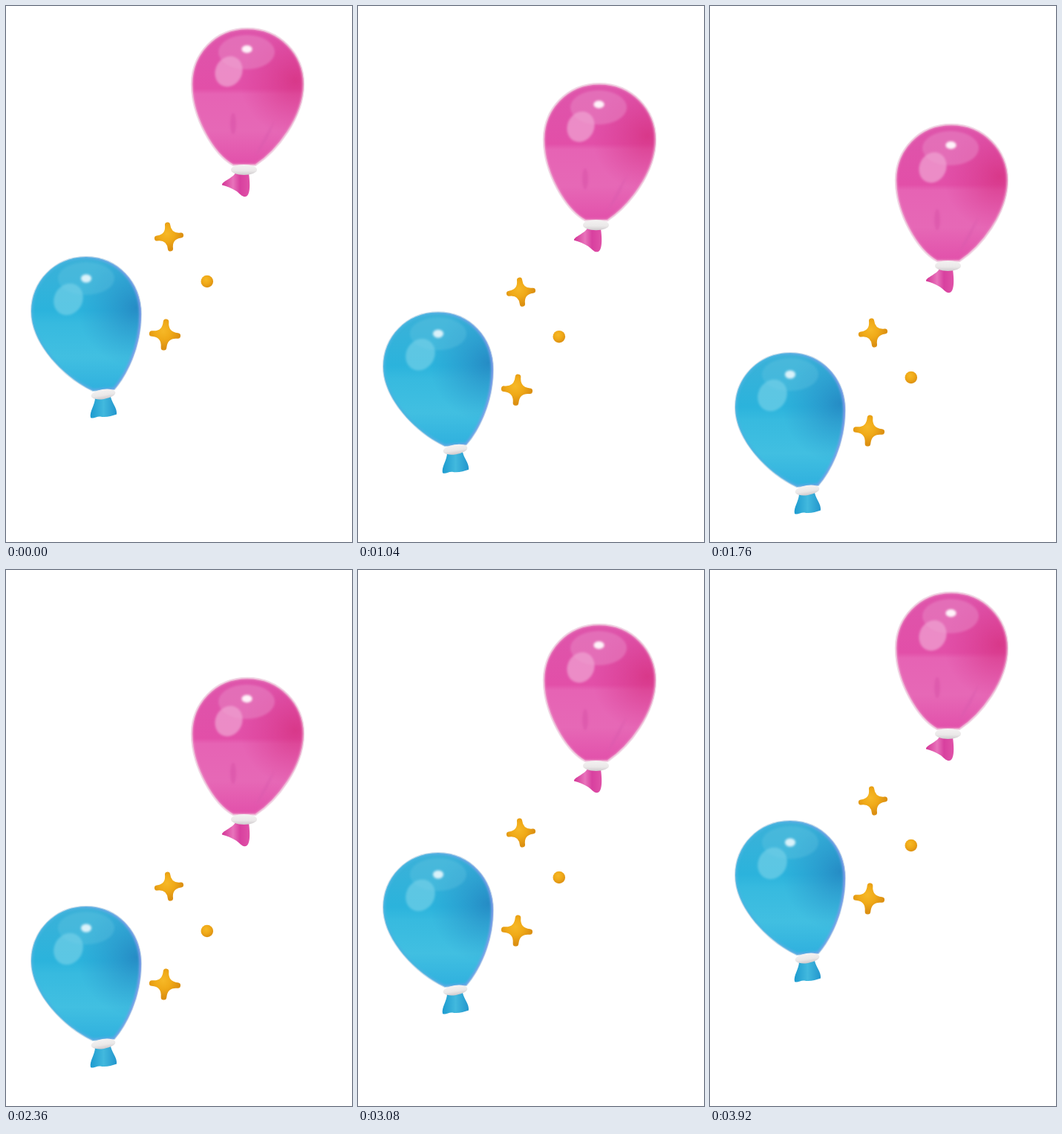
These frames come from a looping animation (466x720 px, 3.96 s). An HTML page:

```html
<!DOCTYPE html>
<html lang="en">
<head>
<meta charset="utf-8">
<title>Floating balloons</title>
<style>
  html, body { margin: 0; width: 100%; height: 100%; overflow: hidden; background: #fff; }
  svg { display: block; }
</style>
</head>
<body>
<svg width="466" height="720" viewBox="0 0 466 720">
  <defs>
    <linearGradient id="pinkBody" x2="0" y2="1">
      <stop offset="0" stop-color="#de55ab"/>
      <stop offset=".44" stop-color="#e24fa8"/>
      <stop offset=".48" stop-color="#e663b4"/>
      <stop offset=".75" stop-color="#e668b6"/>
      <stop offset="1" stop-color="#e250aa"/>
    </linearGradient>
    <radialGradient id="pinkShade" gradientUnits="userSpaceOnUse" cx="390" cy="100" r="75">
      <stop offset="0" stop-color="#d5307f" stop-opacity=".75"/>
      <stop offset="1" stop-color="#d93a92" stop-opacity="0"/>
    </radialGradient>
    <linearGradient id="blueBody" x2="0" y2="1">
      <stop offset="0" stop-color="#3cb1d8"/>
      <stop offset=".4" stop-color="#2bb3dc"/>
      <stop offset=".5" stop-color="#37badf"/>
      <stop offset=".75" stop-color="#41bfe1"/>
      <stop offset="1" stop-color="#2fb0de"/>
    </linearGradient>
    <radialGradient id="blueShade" gradientUnits="userSpaceOnUse" cx="176" cy="405" r="80">
      <stop offset="0" stop-color="#2482bf" stop-opacity=".8"/>
      <stop offset="1" stop-color="#2a96cc" stop-opacity="0"/>
    </radialGradient>
    <linearGradient id="blueRim">
      <stop offset=".3" stop-color="#45b4e0"/>
      <stop offset="1" stop-color="#809cea"/>
    </linearGradient>
    <linearGradient id="pinkTail">
      <stop offset="0" stop-color="#d43596"/>
      <stop offset=".4" stop-color="#e873bb"/>
      <stop offset=".65" stop-color="#d8409f"/>
      <stop offset="1" stop-color="#e052a8"/>
    </linearGradient>
    <linearGradient id="blueTail">
      <stop offset="0" stop-color="#1d9bcf"/>
      <stop offset=".5" stop-color="#42b9de"/>
      <stop offset="1" stop-color="#2396cd"/>
    </linearGradient>
    <linearGradient id="collar" x2="0" y2="1">
      <stop offset="0" stop-color="#f4f2f2"/>
      <stop offset=".6" stop-color="#eae8e8"/>
      <stop offset="1" stop-color="#cfcacd"/>
    </linearGradient>
    <radialGradient id="gold" cx=".42" cy=".36" r=".65">
      <stop offset="0" stop-color="#f6b827"/>
      <stop offset=".5" stop-color="#f0aa18"/>
      <stop offset="1" stop-color="#dc9012"/>
    </radialGradient>
    <filter id="soft" x="-50%" y="-50%" width="200%" height="200%"><feGaussianBlur stdDeviation="1.8"/></filter>
    <path id="pinkShape" d="M325 30C369 30 401 65 401 105C401 150 365 195 336 214L306 214C280 200 250 150 250 105C250 65 281 30 325 30Z"/>
    <path id="blueShape" d="M108 337C150 337 182 371 182 414C182 460 161 498 146 515L117 517C80 500 34 455 34 410C34 371 65 337 108 337Z"/>
    <clipPath id="pinkClip"><use href="#pinkShape"/></clipPath>
    <clipPath id="blueClip"><use href="#blueShape"/></clipPath>
    <path id="star" d="M0-17Q0 0 17 0Q0 0 0 17Q0 0-17 0Q0 0 0-17Z" fill="url(#gold)" stroke="url(#gold)" stroke-width="7.500" stroke-linejoin="round"/>
  </defs>

  <g id="scene">
    <path d="M309 224C306 231 290 236 291 240.500C298 242 304 245 310 248.500C315 252 318 257 323 256C329 254 329 240 327 225Z" fill="url(#pinkTail)"/>
    <use href="#pinkShape" fill="url(#pinkBody)" stroke="#f1dbe7" stroke-width="2.500"/>
    <g clip-path="url(#pinkClip)">
      <use href="#pinkShape" fill="url(#pinkShade)"/>
      <g filter="url(#soft)">
        <ellipse cx="324" cy="62" rx="38" ry="23" fill="#e883c3" opacity=".55"/>
        <ellipse cx="300" cy="88" rx="18" ry="21" fill="#efa0d0" opacity=".75" transform="rotate(25 300 88)"/>
        <ellipse cx="324.500" cy="58" rx="7" ry="5" fill="#fff3fa"/>
        <ellipse cx="306" cy="158" rx="4" ry="14" fill="#d951a9" opacity=".6"/>
        <path d="M362 153Q354 181 335 203Q345 179 362 153Z" fill="#d95aad" opacity=".5"/>
        <use href="#pinkShape" fill="none" stroke="#eda6cd" stroke-width="3"/>
      </g>
    </g>
    <ellipse cx="320.500" cy="220" rx="17.500" ry="7" fill="url(#collar)"/>

    <path d="M120 526C120 536 112 545 114 553C118 555 122 551 127 551.500C134 553 142 551 149 548.500C150 540 143 534 141 525Z" fill="url(#blueTail)"/>
    <use href="#blueShape" fill="url(#blueBody)" stroke="#c5dcea" stroke-width="2"/>
    <g clip-path="url(#blueClip)">
      <use href="#blueShape" fill="url(#blueShade)"/>
      <g filter="url(#soft)">
        <ellipse cx="108" cy="366" rx="38" ry="22" fill="#6bc6e2" opacity=".3"/>
        <ellipse cx="84" cy="394" rx="19" ry="22" fill="#77d2e9" opacity=".65" transform="rotate(30 84 394)"/>
        <ellipse cx="108" cy="366" rx="7" ry="5.500" fill="#d9f2fa"/>
        <use href="#blueShape" fill="none" stroke="url(#blueRim)" stroke-width="5"/>
      </g>
    </g>
    <ellipse cx="131" cy="521.500" rx="16.500" ry="6.500" fill="url(#collar)" transform="rotate(-9 131 521.500)"/>

    <use href="#star" transform="translate(219.500 310) rotate(-7) scale(.95)"/>
    <use href="#star" transform="translate(214 441.500) rotate(5) scale(1.020)"/>
    <circle cx="270.800" cy="370" r="8.300" fill="url(#gold)"/>
  </g>
</svg>
<script>
const LOOP = 3960, STEP = 40;
const scene = document.getElementById('scene');

// [time in ms, vertical drop in px]
const keys = [
  [0, 0], [560, 17.5], [680, 28], [1120, 84], [1400, 113], [1680, 128], [1760, 129],
  [1900, 130.5], [2240, 119.5], [2360, 115], [2800, 77.5], [3080, 43], [3360, 16.5], [3920, 0]
];

// Tangent at a key; flat at both ends of the loop.
function slope(i) {
  if (i === 0 || i === keys.length - 1) return 0;
  const [a, b] = [keys[i - 1], keys[i + 1]];
  return (b[1] - a[1]) / (b[0] - a[0]);
}

function dropAt(time) {
  const i = keys.findIndex(key => key[0] > time) - 1;
  if (i < 0) return 0;
  const [t0, y0] = keys[i], [t1, y1] = keys[i + 1];
  const span = t1 - t0, u = (time - t0) / span, v = 1 - u;
  return v * v * (1 + 2 * u) * y0 + u * u * (1 + 2 * v) * y1
    + span * u * v * (v * slope(i) - u * slope(i + 1));
}

function draw() {
  const time = Math.floor(performance.now() % LOOP / STEP) * STEP;
  scene.setAttribute('transform', `translate(0 ${dropAt(time).toFixed(2)})`);
  requestAnimationFrame(draw);
}
draw();
</script>
</body>
</html>
```
